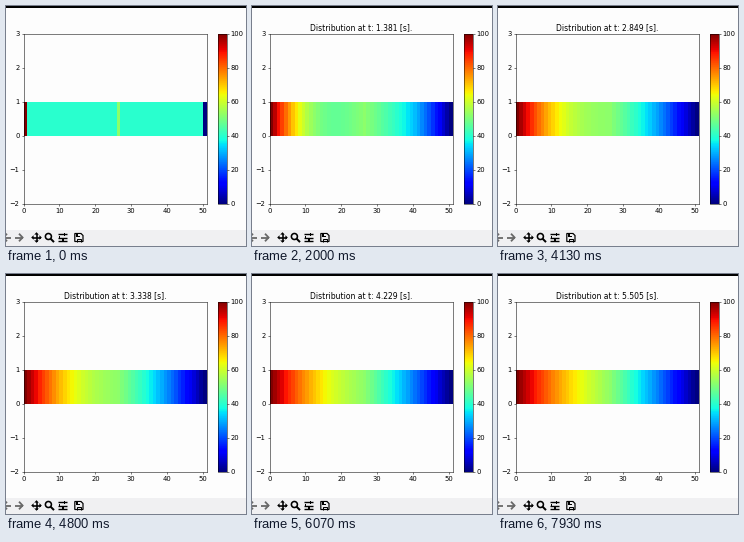
A matplotlib script that plays this animation: 240 by 240 pixels, repeating every 8000 ms.

```python
import numpy as np
import matplotlib.pyplot as plt
from matplotlib.animation import FuncAnimation
from matplotlib.patches import Circle, Polygon, Rectangle

SIZE, DPI = 240, 100
FRAMES, LOOP = 120, 8000
SCALE = 0.46          # the plot window is shown at reduced size
PAPER, BAR = "#fdfdfd", "#f0f0f2"

# Heat conduction along a rod
A, LENGTH, NODES = 110, 100, 51
DX = LENGTH / NODES
DT = 0.5 * DX ** 2 / A

# The solver runs at a slightly uneven pace
PACE_FRAME = [0, 30, 48, 61, 81, 100, 118, 119]
PACE_STEP = [0, 79, 127, 163, 214, 267, 315, 316]
STEPS = np.rint(np.interp(np.arange(FRAMES), PACE_FRAME, PACE_STEP)).astype(int)


def solve(count):
    """Both ends and the middle node are held at a fixed temperature."""
    u = np.full(NODES, 40.0)
    held = [0, 26, -1]
    u[held] = 100, 52, 0
    states = [u]
    for _ in range(count):
        w = u.copy()
        w[1:-1] += A * DT / DX ** 2 * (u[:-2] - 2 * u[1:-1] + u[2:])
        w[held] = u[held]
        states.append(w)
        u = w
    return states


STATES = solve(STEPS[-1])

plt.rcParams.update({
    "font.family": "DejaVu Sans",
    "font.size": 10.6 * SCALE,
    "axes.linewidth": 0.8 * SCALE,
    "axes.titlesize": 12 * SCALE,
    "axes.titlepad": 6 * SCALE,
    "axes.facecolor": PAPER,
})
for k in ("xtick", "ytick"):
    plt.rcParams.update({
        f"{k}.major.size": 3.5 * SCALE,
        f"{k}.major.pad": 3 * SCALE,
        f"{k}.major.width": 0.8 * SCALE,
    })

fig = plt.figure(figsize=(SIZE / DPI, SIZE / DPI), dpi=DPI, facecolor=PAPER)


def add_axes(x, y, w, h):
    return fig.add_axes([x / SIZE, 1 - (y + h) / SIZE, w / SIZE, h / SIZE])


def draw_window():
    ax = add_axes(0, 0, SIZE, SIZE)
    ax.set(xlim=(0, SIZE), ylim=(SIZE, 0))
    ax.axis("off")
    ax.set_zorder(-1)

    def box(x, y, w, h, color):
        ax.add_patch(Rectangle((x, y), w, h, fc=color, ec="none"))

    def line(xs, ys, color="black", width=1.2):
        ax.plot(xs, ys, color=color, lw=width * 72 / DPI,
                solid_capstyle="butt", solid_joinstyle="miter")

    box(0, 0, SIZE, 2, "black")
    box(0, 223.5, SIZE, 16.5, BAR)
    cy, gray = 231.5, "#686868"

    # back and forward
    line([-3, 5], [cy, cy], gray, 1.8)
    line([1, -2.6, 1], [cy - 3.8, cy, cy + 3.8], gray, 1.8)
    line([8.5, 16.5], [cy, cy], gray, 1.8)
    line([13, 16.6, 13], [cy - 3.8, cy, cy + 3.8], gray, 1.8)

    # pan
    cx = 30.5
    line([cx - 4, cx + 4], [cy, cy], width=1.6)
    line([cx, cx], [cy - 4, cy + 4], width=1.6)
    for dx, dy in ((1, 0), (-1, 0), (0, 1), (0, -1)):
        tip = (cx + 5.3 * dx, cy + 5.3 * dy)
        bx, by = cx + 2.9 * dx, cy + 2.9 * dy
        ax.add_patch(Polygon([tip, (bx - 2.3 * dy, by + 2.3 * dx),
                              (bx + 2.3 * dy, by - 2.3 * dx)],
                             fc="black", ec="none"))

    # zoom
    ax.add_patch(Circle((42.4, cy - 1), 3, fc="none", ec="black",
                        lw=1.6 * 72 / DPI))
    line([44.4, 48], [cy + 1, cy + 4.6], width=2)

    # sliders
    for dy, knob in ((-3.3, 58.5), (0, 53.5), (3.3, 57)):
        line([51.5, 61], [cy + dy, cy + dy], width=1.4)
        box(knob - 0.8, cy + dy - 1.4, 1.6, 2.8, "black")

    # save
    ax.add_patch(Polygon([(68.8, cy - 4), (75, cy - 4), (77, cy - 2),
                          (77, cy + 4), (68.8, cy + 4)],
                         fc=BAR, ec="black", lw=1.2 * 72 / DPI))
    box(70.3, cy - 4, 4, 3, "black")
    box(72.4, cy - 3.4, 1.1, 1.7, BAR)
    line([70.9, 70.9, 75, 75], [cy + 4, cy + 1, cy + 1, cy + 4], width=1)


draw_window()

TOP, HEIGHT = 27.6, 170
ax = add_axes(17.6, TOP, 183, HEIGHT)
mesh = ax.pcolormesh(np.arange(NODES + 1), [0, 1], STATES[0][None, :],
                     cmap="jet", vmin=0, vmax=100)
ax.set(xlim=(0, NODES), ylim=(-2, 3),
       xticks=range(0, 51, 10), yticks=range(-2, 4))
title = ax.set_title("")

cax = add_axes(211.6, TOP, 9, HEIGHT)
fig.colorbar(mesh, cax=cax, ticks=range(0, 101, 20))


def update(i):
    n = STEPS[i]
    mesh.set_array(STATES[n][None, :])
    title.set_text(f"Distribution at t: {n * DT:.3f} [s]." if n else "")
    return mesh, title


anim = FuncAnimation(fig, update, frames=FRAMES, interval=LOOP / FRAMES,
                     repeat=True, repeat_delay=0, blit=False)
plt.show()
```
